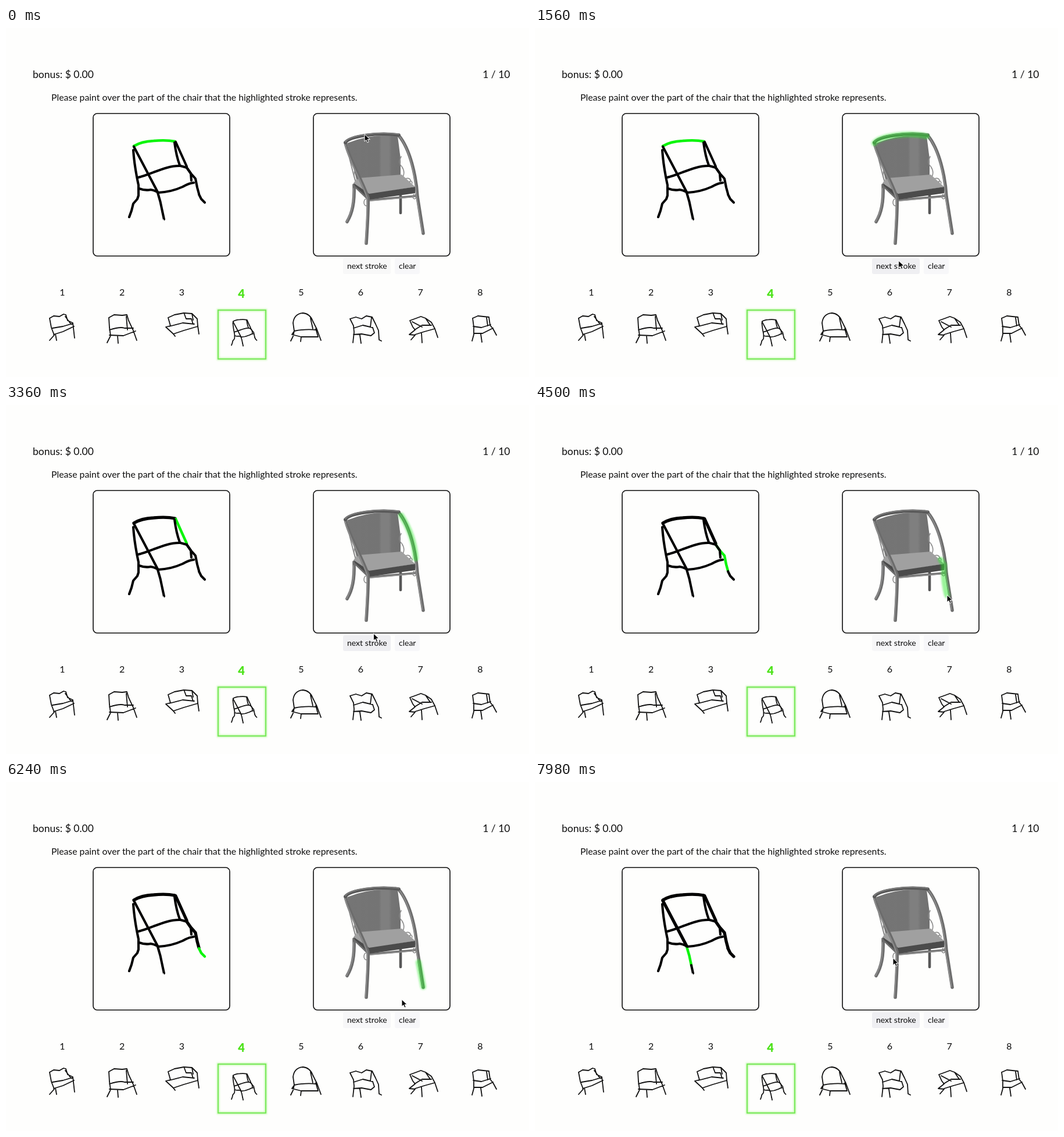
Animation of 900 by 600 pixels, one loop 8000 ms. Source, as an HTML page:

```html
<!DOCTYPE html>
<html lang="en">
<head>
<meta charset="utf-8">
<title>Chair strokes</title>
<style>
  html, body { margin: 0; width: 100%; height: 100%; overflow: hidden; background: #fefefd; }
  svg { display: block; width: 900px; height: 600px; font: 15.8px Lato, sans-serif; }
  text { fill: #0e0e0e; }
  path { fill: none; stroke-linecap: round; stroke-linejoin: round; }
  .mid { text-anchor: middle; }
  .panel { fill: none; stroke: #0a0a0a; stroke-width: 1.6; }
  .thumb path { stroke: #121212; stroke-width: 1.8; }
  #mini path { stroke-width: 5.2; }
  #sketch path { stroke: #000; stroke-width: 4.1; }
  #sketch .active { stroke: #0cf50c; stroke-width: 4.5; }
  #sketch .done { stroke-width: 5.3; }
  #paint path { stroke: #2be82b; stroke-opacity: .48; stroke-width: 10; }
  .tube { stroke: #6c6c6c; stroke-width: 5.6; }
  .shine { stroke: #8d8d8d; stroke-width: 1.9; }
  .dark { stroke: #585858; }
  .curl { stroke: #8e8e8e; stroke-width: 1.6; }
</style>
</head>
<body>
<svg viewBox="0 0 900 600">
  <defs>
    <filter id="soft" x="-30%" y="-30%" width="160%" height="160%"><feGaussianBlur stdDeviation="1.6"/></filter>
    <linearGradient id="mesh">
      <stop offset="0" stop-color="#757575"/>
      <stop offset=".6" stop-color="#747474"/>
      <stop offset=".64" stop-color="#7f7f7f"/>
      <stop offset=".78" stop-color="#7f7f7f"/>
      <stop offset=".83" stop-color="#757575"/>
      <stop offset="1" stop-color="#717171"/>
    </linearGradient>
  </defs>

  <text x="46" y="86" font-size="17.5">bonus: $ 0.00</text>
  <text x="867.5" y="86" font-size="17.5" text-anchor="end">1 / 10</text>
  <text x="78" y="125">Please paint over the part of the chair that the highlighted stroke represents.</text>
  <rect class="panel" x="150" y="147" width="235" height="245" rx="7"/>
  <rect class="panel" x="529" y="147" width="235" height="245" rx="7"/>

  <g id="sketch"></g>

  <g id="chair">
    <path class="tube dark" style="stroke-width:4.6" d="M679 288V318"/>
    <path class="tube" d="M599 270C600 300 596 318 587 333"/>
    <path class="shine" d="M598 276C599 302 594 318 586 333"/>
    <path style="fill:url(#mesh)" d="M587 198Q630 181 674 186L679 225V256L604 264Z"/>
    <path class="shine" d="M586 200Q593 235 602 266"/>
    <path class="curl" d="M680 221Q674 232 681 238Q688 248 682 258M686 262a5 4 0 1 1 7 4M692 267q6-8 7 0"/>
    <path class="curl" d="M601 243Q596 254 603 264"/>
    <path style="fill:#a0a0a0" d="M598 266L607 258L681 252L704 273L625 286Z"/>
    <path class="tube" style="stroke-width:3.6" d="M599 271L625 296L704 289"/>
    <path style="fill:#4b4b4b" d="M599 267L625 285L704 273V284L626 295L600 271Z"/>
    <path class="shine" d="M626 297L704 290"/>
    <path class="curl" d="M619 294a4 6 0 1 0 2 0M702 286a3 4 0 1 0 2 0"/>
    <path class="tube" d="M676 185C696 209 706 256 708 290L718 353"/>
    <path class="shine" d="M676 185C695 209 704.500 256 706.500 290L716.500 352"/>
    <path class="tube" d="M584 197C590 225 613 262 623 292Q624 310 620 370"/>
    <path class="shine" d="M583 198C588.500 225 611.500 262 621.500 292Q622.500 310 618.500 370"/>
    <path class="tube dark" d="M584 197C591 186 640 179 676 184"/>
    <path class="shine" style="stroke:#7c7c7c" d="M584 195.500C591 184.500 640 177.500 676 182.500"/>
  </g>
  <g id="paint" filter="url(#soft)"></g>

  <rect id="next" x="580" y="396" width="82" height="27" rx="3" fill="#e6e6ea"/>
  <rect x="669" y="396" width="43" height="27" rx="3" fill="#f7f7f9"/>
  <text x="587" y="414" font-size="14">next stroke</text>
  <text x="676" y="414" font-size="14">clear</text>

  <g id="numbers"></g>
  <rect x="365" y="485" width="82" height="84" fill="none" stroke="#7cf04c" stroke-width="4" opacity=".5" filter="url(#soft)"/>
  <rect x="365" y="485" width="82" height="84" fill="none" stroke="#74e856" stroke-width="1.8"/>

  <g class="thumb">
    <path d="M75 499L82 495L92 496L99 492L103 493L106 503L115 507L118 533M75 499L78 515L83 528L75 537M80 516L98 513L115 508M82 527L98 522L117 513M85 526L87 537M102 496L111 508"/>
    <path d="M177 498L186 493L200 494L208 493L211 503L219 520L225 537M177 498L178 515L180 529L174 541M207 496L209 519M178 519Q197 513 204 516L219 516M178 528L202 529L223 521M192 529L193 542"/>
    <path d="M279 498L290 493L306 490L320 491L329 500L330 512L332 526M279 498L283 512L275 514L288 526L306 520L330 513M281 513L304 507L324 509M288 526L291 530M307 492L310 500L319 500L322 509M320 491L322 502"/>
    <path d="M494 507Q496 491 511 490Q523 491 528 504L535 518L542 537M494 507L496 521L494 530L490 538M496 521Q515 517 534 519M496 521L492 527L508 531L537 531L533 517M508 531L507 539M524 499L528 517"/>
    <path d="M592 500L602 497L612 500L620 495L630 497L636 509L641 520L642 536L646 538M592 500L598 512L599 523L597 541M598 516L614 511L631 515L634 524L628 529L612 526L598 527M609 528L611 542M629 498L627 514"/>
    <path d="M695 503L706 499L714 496L722 499L732 506L738 517L743 532M695 503L700 514L704 519L694 527L704 528L697 536M703 519L716 511L732 511M704 527L720 522L738 517M715 525L716 541M699 505L716 514M722 499L730 511"/>
    <path d="M803 499L812 495L831 497L833 511L838 517L844 528M803 499L805 514L805 527L802 538M804 513L818 515L834 510M805 525L820 525L838 516M817 526L819 540M827 498L829 512"/>
    <g id="mini" transform="translate(317 436.5) scale(.335)"></g>
  </g>

  <path id="cursor" style="fill:#000;stroke:#fff;stroke-width:1" d="M0 0V12L3 9.4L5 14L7.2 13L5.2 8.6H9Z"/>
</svg>
<script>
const LOOP = 8000, STEP = 60;
const $ = id => document.getElementById(id);

function add(parent, tag, attrs) {
  const el = document.createElementNS('http://www.w3.org/2000/svg', tag);
  for (const key in attrs) el.setAttribute(key, attrs[key]);
  return parent.appendChild(el);
}

// Strokes in highlighting order, followed by those that stay idle.
const strokes = [
  'M220 203Q233 195 254 194Q276 192 291 195',
  'M292 196L311 238',
  'M311 240L318 250L326 259L329 274L332 285',
  'M332 286L336 294L342 300',
  'M220 204L261 282',
  'M261 283Q266 298 269 315',
  'M269 315L272 329',
  'M290 197Q293 220 299 236',
  'M311 240L318 250L319 262',
  'M227 257C250 252 275 236 300 237L311 240',
  'M229 276Q240 280 249 278Q256 279 262 283Q284 282 304 273Q314 267 323 266',
  'M219 210Q221 238 228 270L228 288L226 294L219 302L216 314L212 325'
];
const lines = strokes.map(d => {
  add($('mini'), 'path', { d });
  return add($('sketch'), 'path', { d });
});
add($('sketch'), 'circle', { cx: 271, cy: 330, r: 1, fill: '#fff' });

for (let n = 1; n <= 8; n++) {
  const on = n === 4;
  add($('numbers'), 'text', {
    class: 'mid', x: 97 + (n - 1) * 102.7, y: on ? 464 : 460,
    style: on ? 'font-size:20px;font-weight:900;fill:#4fe31c' : 'font-size:16px'
  }).textContent = n;
}

// Each brush stroke: painted from start to end, cleared by the click.
const brushes = [
  { start: 300, end: 960, click: 1700, d: 'M584 198C592 186 640 179 674 186' },
  { start: 2340, end: 3000, click: 3500, d: 'M680 190Q702 224 705 264' },
  { start: 3960, end: 4500, click: 5040, d: 'M698 266L704 275Q702 300 709 327' },
  { start: 5640, end: 6000, click: 6480, d: 'M710 310L718 352' },
  { start: 7020, end: 7380, click: 7680, d: 'M586 200C592 225 612 260 622 290' }
];
for (const b of brushes) {
  b.path = add($('paint'), 'path', { d: b.d });
  b.length = b.path.getTotalLength();
}

const stops = [
  [0, 617, 183], [2220, 690, 201], [5460, 702, 310],
  [6960, 589, 204], [7980, 616, 303], [LOOP, 616, 303]
];
for (const b of brushes) {
  const first = b.path.getPointAtLength(0), last = b.path.getPointAtLength(b.length);
  stops.push([b.start, first.x, first.y], [b.end, last.x, last.y], [b.end + 120, last.x, last.y],
    [b.click - 80, 624, 408], [b.click + 60, 624, 408]);
}
stops.sort((a, b) => a[0] - b[0]);

const clamp = v => Math.min(1, Math.max(0, v));
const ease = v => v * v * (3 - 2 * v);
const progress = (b, t) => ease(clamp((t - b.start) / (b.end - b.start)));

function cursorAt(t) {
  const b = brushes.find(b => t >= b.start && t <= b.end);
  if (b) {
    const p = b.path.getPointAtLength(progress(b, t) * b.length);
    return [p.x, p.y];
  }
  const i = Math.max(1, stops.findIndex(s => s[0] >= t));
  const [t0, x0, y0] = stops[i - 1], [t1, x1, y1] = stops[i];
  const k = ease(clamp((t - t0) / (t1 - t0)));
  return [x0 + (x1 - x0) * k, y0 + (y1 - y0) * k];
}

function hoverAt(t) {
  return Math.max(...brushes.map(b => {
    const since = t - b.click;
    return since < 90 ? clamp((since + 180) / 100) : Math.exp((90 - since) / 230);
  }));
}

function draw(elapsed) {
  const t = Math.floor(elapsed % LOOP / STEP) * STEP;
  const current = brushes.filter(b => t >= b.click).length;
  lines.forEach((line, i) => line.setAttribute('class', i === current ? 'active' : i < current ? 'done' : ''));
  for (const b of brushes) {
    b.path.style.visibility = t > b.start && t < b.click ? 'visible' : 'hidden';
    b.path.style.strokeDasharray = `${progress(b, t) * b.length} 999`;
  }
  $('next').style.fillOpacity = 0.3 + 0.7 * hoverAt(t);
  $('cursor').setAttribute('transform', `translate(${cursorAt(t)})`);
}

const origin = performance.now();
function tick(now) {
  draw(Math.max(0, now - origin));
  requestAnimationFrame(tick);
}
tick(origin);
</script>
</body>
</html>
```
